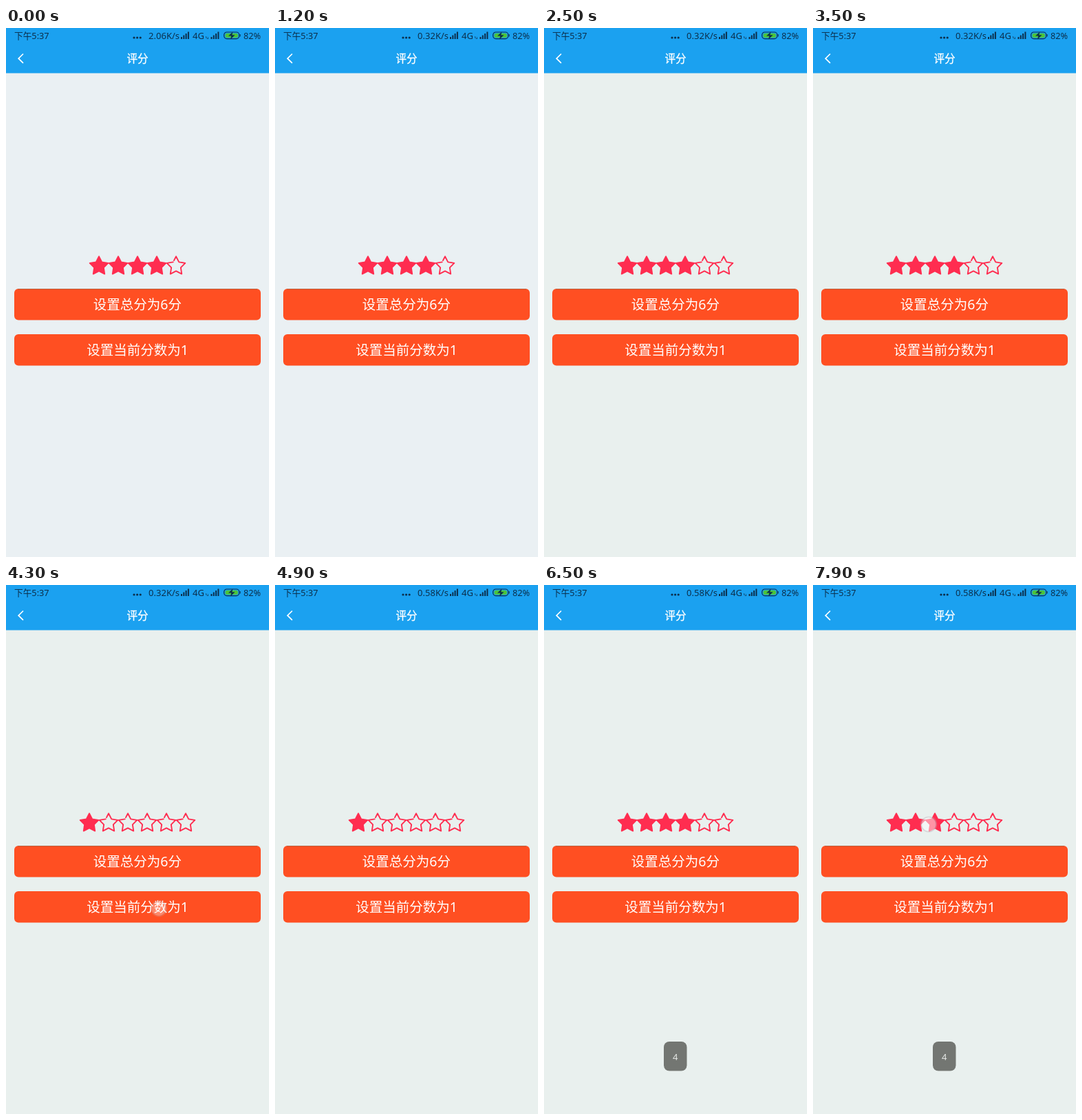
Animation of 382x767 px, one loop 8 s. Source, as an HTML page:

```html
<!DOCTYPE html>
<html lang="zh-CN">
<head>
<meta charset="utf-8">
<title>评分</title>
<style>
  html, body { margin: 0; height: 100%; overflow: hidden; }
  svg { display: block; width: 100%; height: 100%; }
  text { font-family: "Noto Sans", "Noto Sans CJK SC", sans-serif; }
  .status { font-size: 12.7px; fill: #0c2f4c; }
  .label { font-size: 19.5px; fill: #fff; }
</style>
</head>
<body>
<svg viewBox="0 0 382 767">
  <defs>
    <path id="bars" d="M0 16v-3h2v3zM3.3 16v-5.500h2v5.500zM6.600 16v-8h2v8zM9.900 16v-10.500h2v10.500z" fill="#0c2f4c"/>
  </defs>
  <rect id="page" width="382" height="767"/>
  <rect width="382" height="65.500" fill="#1ba1f0"/>

  <text class="status" x="12" y="16">下午5:37</text>
  <g fill="#0c2f4c">
    <circle cx="186" cy="14" r="1.600"/>
    <circle cx="190.600" cy="14" r="1.600"/>
    <circle cx="195.200" cy="14" r="1.600"/>
    <path d="M289.500 12.500h2v3.500zM292 16h2v-3.500z" opacity=".7"/>
  </g>
  <text id="speed" class="status" x="252" y="16" text-anchor="end" style="font-size:13px"></text>
  <use href="#bars" x="254"/>
  <text class="status" x="271" y="16" style="font-size:13px">4G</text>
  <use href="#bars" x="297.500"/>
  <rect x="316.700" y="6" width="22" height="9.600" rx="4" fill="#1ba1f0" stroke="#0c2f4c" stroke-width="1.200"/>
  <rect x="318.500" y="7.700" width="18.400" height="6.200" rx="2.500" fill="#4cc33c"/>
  <path d="M339.700 9h1v3.500h-1z" fill="#0c2f4c"/>
  <path d="M329.500 5.500l-6.500 6h4.200l-1.200 5 6.500-6.300h-4.200z" fill="#0c2f4c"/>
  <text class="status" x="345" y="16">82%</text>

  <path d="M25 37.500l-6.800 6.700 6.800 6.700" fill="none" stroke="#fff" stroke-width="1.700"/>
  <text x="175.400" y="50" font-size="15.600" font-weight="500" fill="#fff" stroke="#fff" stroke-width=".3">评分</text>

  <g id="stars" stroke="#ff2d50" stroke-width="1.900" stroke-linejoin="round" stroke-linecap="round"></g>

  <rect x="12" y="378" width="358" height="45.500" rx="6" fill="#ff4f22"/>
  <path d="M17 378.500h348" stroke="#8a6a50" opacity=".6"/>
  <text class="label" x="126.800" y="408">设置总分为6分</text>
  <rect x="12" y="444" width="358" height="45.500" rx="6" fill="#ff4f22"/>
  <text class="label" x="117.300" y="473.500">设置当前分数为1</text>

  <g id="toast">
    <rect x="174" y="662" width="33.500" height="42.500" rx="8" fill="#737672"/>
    <text x="190.800" y="688.500" font-size="13" fill="#e6e8e6" text-anchor="middle">4</text>
  </g>
  <g id="touch">
    <circle r="12.500" fill="#fff" opacity=".12"/>
    <circle r="10.700" fill="#fff" fill-opacity=".42" stroke="#9a8f9c" stroke-opacity=".28" stroke-width="1.800"/>
  </g>
</svg>
<script>
const LOOP = 8000, STEP = 100;
const $ = id => document.getElementById(id);

// Open outline with a small gap beside the upper left notch.
const pts = [];
for (let i = 0; i < 10; i++) {
  const r = i % 2 ? 7.2 : 14, a = (i / 5 - .5) * Math.PI;
  pts.push([r * Math.cos(a), r * Math.sin(a)]);
}
const [top0, notch] = [pts[0], pts[9]];
const start = notch.map((v, i) => v + (top0[i] - v) * .28);
const outline = 'M' + [start, ...pts].join('L');

const stars = Array.from({ length: 6 }, () => {
  const star = document.createElementNS('http://www.w3.org/2000/svg', 'path');
  return $('stars').appendChild(star);
});

// Each tap: start, begin of fade, end, x, y
const taps = [
  [1900, 2000, 2200, 326, 401],
  [4100, 4200, 4500, 222, 469],
  [5900, 6000, 6300, 202, 344.5],
  [7800, 7900, 8200, 168, 347]
];

function draw(t) {
  const total = t < 2000 ? 5 : 6;
  const score = t < 4200 ? 4 : t < 6100 ? 1 : t < 7900 ? 4 : 3;
  $('page').setAttribute('fill', t < 1900 ? '#eaf0f3' : '#e9f0ee');
  $('speed').textContent = (t < 1200 ? '2.06' : t < 4800 ? '0.32' : '0.58') + 'K/s';

  stars.forEach((star, i) => {
    const full = i < score;
    star.setAttribute('d', outline + (full ? 'Z' : ''));
    star.setAttribute('fill', full ? '#ff2d50' : 'none');
    star.setAttribute('transform', `translate(${191 + 28 * (i - (total - 1) / 2)} 345.2)`);
    star.setAttribute('visibility', i < total ? 'visible' : 'hidden');
  });

  const tap = taps.find(([from, , to]) => t >= from && t < to);
  $('touch').setAttribute('visibility', tap ? 'visible' : 'hidden');
  if (tap) {
    const [, fade, to, x, y] = tap;
    $('touch').setAttribute('transform', `translate(${x} ${y})`);
    $('touch').setAttribute('opacity', Math.min(1, (to - t) / (to - fade)));
  }

  const shown = Math.min(1, Math.max(0, (t - 6100) / 400));
  $('toast').setAttribute('opacity', shown);
  $('toast').setAttribute('transform', `translate(0 ${20 * (1 - shown) ** 2})`);
}

function frame() {
  draw(Math.floor(performance.now() % LOOP / STEP) * STEP);
  requestAnimationFrame(frame);
}
frame();
</script>
</body>
</html>
```
